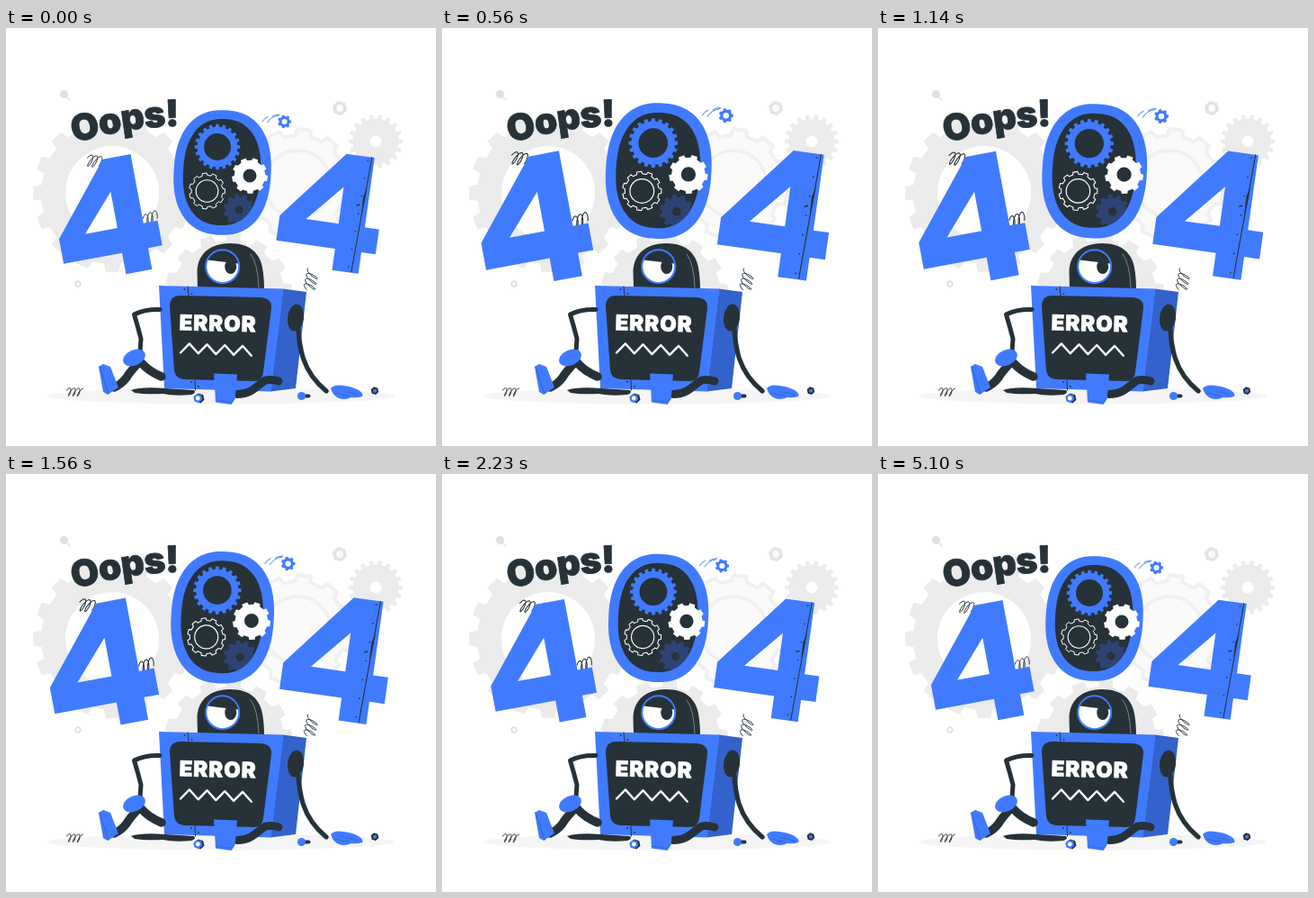
Recreate the animation shown at these times as an HTML page with a canvas. Size 478 by 464 pixels, loop 7.47 s.

```html
<!DOCTYPE html>
<html lang="en">
<head>
<meta charset="utf-8">
<title>404 robot</title>
<style>
html, body { margin: 0; width: 100%; height: 100%; overflow: hidden; background: #fff; }
canvas { display: block; width: 100%; height: 100%; }
</style>
</head>
<body>
<canvas id="stage"></canvas>
<script>
const W = 478, H = 464, LOOP = 7470, TAU = Math.PI * 2;
const BLUE = '#407bff', SIDE = '#3362cc', NAVY = '#2d4373', DARK = '#263238';
const GREY = '#ebebeb', PALE = '#fafafa', WHITE = '#fff';
const canvas = document.getElementById('stage');
const ctx = canvas.getContext('2d');
const ratio = window.devicePixelRatio || 1;
canvas.width = W * ratio;
canvas.height = H * ratio;

const toPath = shape => typeof shape === 'string' ? new Path2D(shape) : shape;

function fill(shape, color) {
  ctx.fillStyle = color;
  ctx.fill(toPath(shape), 'evenodd');
}

function stroke(shape, color, width) {
  ctx.strokeStyle = color;
  ctx.lineWidth = width;
  ctx.lineCap = ctx.lineJoin = 'round';
  ctx.stroke(toPath(shape));
}

// Path through count points, each given by at(index)
function trace(count, at, closed = true) {
  const p = new Path2D();
  for (let i = 0; i < count; i++) p.lineTo(...at(i));
  if (closed) p.closePath();
  return p;
}

const polar = (x, y, r, a) => [x + r * Math.cos(a), y + r * Math.sin(a)];

function disc(x, y, rx, ry = rx, turn = 0) {
  const p = new Path2D();
  p.ellipse(x, y, rx, ry, turn, 0, TAU);
  return p;
}

function gear(x, y, tip, root, teeth, hole = 0, phase = 0) {
  const corners = [-.29, -.21, .21, .29];
  const p = trace(teeth * 4, i => {
    const k = i % 4, r = k === 1 || k === 2 ? tip : root;
    return polar(x, y, r, phase + ((i - k) / 4 + corners[k]) * TAU / teeth);
  });
  if (hole) p.addPath(disc(x, y, hole));
  return p;
}

function nut(x, y, r, color, holeColor, turn = .3) {
  fill(trace(6, i => polar(x, y, r, turn + i * TAU / 6)), color);
  fill(disc(x, y, r * .46), holeColor);
}

// Loose spring wound around the line from (x0, y0) to (x1, y1)
function coil(x0, y0, x1, y1, loops, r) {
  const len = Math.hypot(x1 - x0, y1 - y0);
  const ux = (x1 - x0) / len, uy = (y1 - y0) / len, count = Math.round(loops * 24);
  stroke(trace(count, i => {
    const a = i / 24 * TAU + .4;
    const across = -r * Math.sin(a), along = i / count * len - r * .35 * Math.cos(a) - across * .4;
    return [x0 + ux * along - uy * across, y0 + uy * along + ux * across];
  }, false), DARK, 1);
}

function oval(x, y, a, b, power, turn) {
  const c = Math.cos(turn), s = Math.sin(turn);
  const bend = v => Math.sign(v) * Math.abs(v) ** (2 / power);
  return trace(160, i => {
    const q = i / 160 * TAU, u = a * bend(Math.cos(q)), v = b * bend(Math.sin(q));
    return [x + u * c - v * s, y + u * s + v * c];
  });
}

// Heavy lettering; each letter turns a little further than the last
function lettering(text, x, y, size, turn, bend, gap, color) {
  ctx.save();
  ctx.translate(x, y);
  ctx.rotate(turn);
  ctx.font = `900 ${size}px Inter, "Open Sans", sans-serif`;
  ctx.fillStyle = ctx.strokeStyle = color;
  ctx.lineWidth = .7;
  for (const ch of text) {
    ctx.fillText(ch, 0, 0);
    ctx.strokeText(ch, 0, 0);
    ctx.translate(ctx.measureText(ch).width + gap, 0);
    ctx.rotate(bend);
  }
  ctx.restore();
}

function backdrop() {
  fill(disc(239, 408.5, 193, 9), '#f5f5f5');
  fill(gear(118, 183, 88, 79, 16), GREY);
  fill(disc(118, 183, 52), WHITE);
  const hollow = gear(324, 173, 61, 54, 11, 0, .26);
  fill(hollow, PALE);
  stroke(hollow, '#f0f0f0', 4);
  stroke(disc(324, 173, 37), '#f0f0f0', 4);
  fill(gear(411, 126, 30, 25.5, 18, 6.5), GREY);
  fill(gear(247, 300, 72, 64, 14, 0, .32), GREY);
  stroke('M65 74L71 80', GREY, 2);
  fill(disc(64.5, 73.5, 4.5), '#e0e0e0');
  nut(371, 89, 8.5, '#e3e3e3', PALE);
  nut(80, 284, 4.2, '#e0e0e0', PALE);
  lettering('Oops!', 76, 127.5, 40.5, -.26, .058, -.9, DARK);
}

// Digit four; the origin is the corner where stem and crossbar meet, lower right
function four(x, y, degrees, detail) {
  ctx.save();
  ctx.translate(x, y);
  ctx.rotate(degrees * Math.PI / 180);
  fill('M-31.5 -106H0V-28H16V0H0V24H-29.5V0H-95.5V-28ZM-29.5 -69V-28H-66Z', BLUE);
  if (detail) detail();
  ctx.restore();
}

function seam() {
  stroke('M-3 -106L-8 23', DARK, 1);
  fill('M-3.5 -72L-6.5 -62L-6 -43L-4.5 -54Z', DARK);
  stroke('M-12 -51L-9.5 -52', DARK, 1.5);
  for (let y = -102; y < 24; y += 20) fill(disc(-7 - (y + 102) * .04, y, .8), DARK);
}

function zero() {
  fill(oval(240.5, 160.5, 54, 69.3, 2.35, .06), BLUE);
  const inner = oval(240, 160, 43, 59, 2.35, .06);
  fill(inner, DARK);
  ctx.save();
  ctx.clip(inner);
  fill(gear(259, 202, 17.5, 14.5, 11, 4.5), NAVY);
  ctx.restore();
  fill(gear(235, 132, 25.3, 22.3, 20, 15), BLUE);
  fill(gear(271, 164, 20, 17.3, 9, 7.5, .15), WHITE);
  stroke(gear(223.5, 181, 20, 17.5, 11), WHITE, 1);
  stroke(disc(223.5, 181, 12.3), WHITE, 1.1);
}

function digits() {
  coil(91, 147, 104, 149, 2.6, 6.5);
  coil(154, 213, 167, 208, 2.6, 5.5);
  four(158, 244.2, -10.6);
  four(395, 249, 8, seam);
  zero();
  fill(gear(309.5, 104, 7.5, 6, 7, 3), BLUE);
  stroke('M285 104Q287 100 291 98.5M290.5 105Q294 98.5 303 97M296 98Q299 96 304 96', BLUE, .9);
}

function head() {
  fill('M213 290L212.5 270C213 250 228 239 249 239C271 239 282 250 285 266Q287 277 287 291Z', DARK);
  stroke('M272 251Q280 261 281 288', '#8e9699', .8);
  const eye = disc(240.7, 264.7, 18.5);
  ctx.save();
  ctx.clip(eye);
  fill('M220 257L262 262V288H220Z', WHITE);
  fill(disc(249.7, 265, 6.5, 8), DARK);
  ctx.restore();
  stroke(eye, BLUE, 2);
}

function body() {
  fill('M308 289.5L334 293L322 400L294 403.5Z', SIDE);
  fill('M170 286L308.5 289.5L294.5 403.5L176 400Z', BLUE);
  fill('M194 297L283 299Q296 300 295 311L286 382Q285 392 275 392L198 390Q188 389 187 380L182 309Q182 297 194 297Z', DARK);
  stroke('M202 287L203 297M210 391L210.5 402', DARK, 1);
  for (const side of [-1, 1]) {
    fill(disc(202.5 + side * 4, 292.5 + side * 2.5, .9), DARK);
    fill(disc(210 + side * 4, 395.5 + side * 2.5, .9), DARK);
  }
  lettering('ERROR', 192.5, 335.5, 24, .02, 0, .9, WHITE);
  stroke(trace(9, i => [194 + i * 9.85, (i % 2 ? 350 : 360.5) + i * .4], false), WHITE, 2.4);
}

function limbs() {
  fill('M139 402Q150 398 177 400L209 402Q212 405 206 407Q188 409 174 406Q155 407 143 405Z', DARK);

  stroke('M171 312.5Q154 312 142.5 318Q147 333 150 345L149 360', DARK, 5);
  stroke('M173 387Q158 381 149 370Q138 381 134 388Q128 396 120 399', DARK, 9.5);
  fill(disc(142.5, 366, 13, 8.5, -.42), BLUE);
  fill('M103 376L108 373L116 376L125 399L113 407L108 404Z', BLUE);
  stroke('M104 376L114 406', SIDE, 1);

  stroke('M257 406.5C276 406 281 394 289 391Q295 389.5 303 392', DARK, 9);
  fill('M231 383.5L257 384.5L254.5 412L250.5 418L233 415.5Z', BLUE);
  stroke('M233 413L250 415.5L253.5 411', SIDE, .8);

  fill(disc(322, 321.5, 9, 15, .13), DARK);
  stroke('M324 325C326 352 327 379 356 403', DARK, 5.3);
  fill('M361 400Q365 395 375 397Q385 398 392 402Q398 406 396 409Q390 411 384 410Q375 414 368 410Q363 407 361 400Z', BLUE);
  stroke('M376 404Q386 404 392 408M366 405Q374 408 382 408', SIDE, .8);
}

function scraps() {
  coil(68, 404, 84, 404.5, 3.2, 4.5);
  nut(215, 411, 5.7, DARK, DARK);
  nut(213.3, 411, 5.2, BLUE, WHITE);
  stroke('M331 408.5H336.5', DARK, 4);
  fill(disc(328.5, 408.5, 4.5), BLUE);
  nut(410, 402.7, 4.5, DARK, BLUE);
}

// Quick swell, slow steady release, a tiny remainder held before rest
function zoom(t) {
  if (t < 140 || t >= 5100) return 1;
  if (t < 628) return 1 + .1 * (t - 130) / 498;
  return 1 + .1 * (2795 - Math.min(t, 2730)) / 2167;
}

function draw(t) {
  const s = zoom(t);
  ctx.setTransform(ratio, 0, 0, ratio, 0, 0);
  fill(`M0 0H${W}V${H}H0Z`, WHITE);
  backdrop();
  ctx.save();
  ctx.translate(237.5, 182);
  ctx.scale(s, s);
  ctx.translate(-237.5, -182);
  digits();
  ctx.restore();
  coil(337, 290, 341, 271, 3.3, 6.5);
  head();
  body();
  limbs();
  scraps();
}

const start = performance.now();
function tick() {
  draw((performance.now() - start) % LOOP);
  requestAnimationFrame(tick);
}
tick();
</script>
</body>
</html>
```
